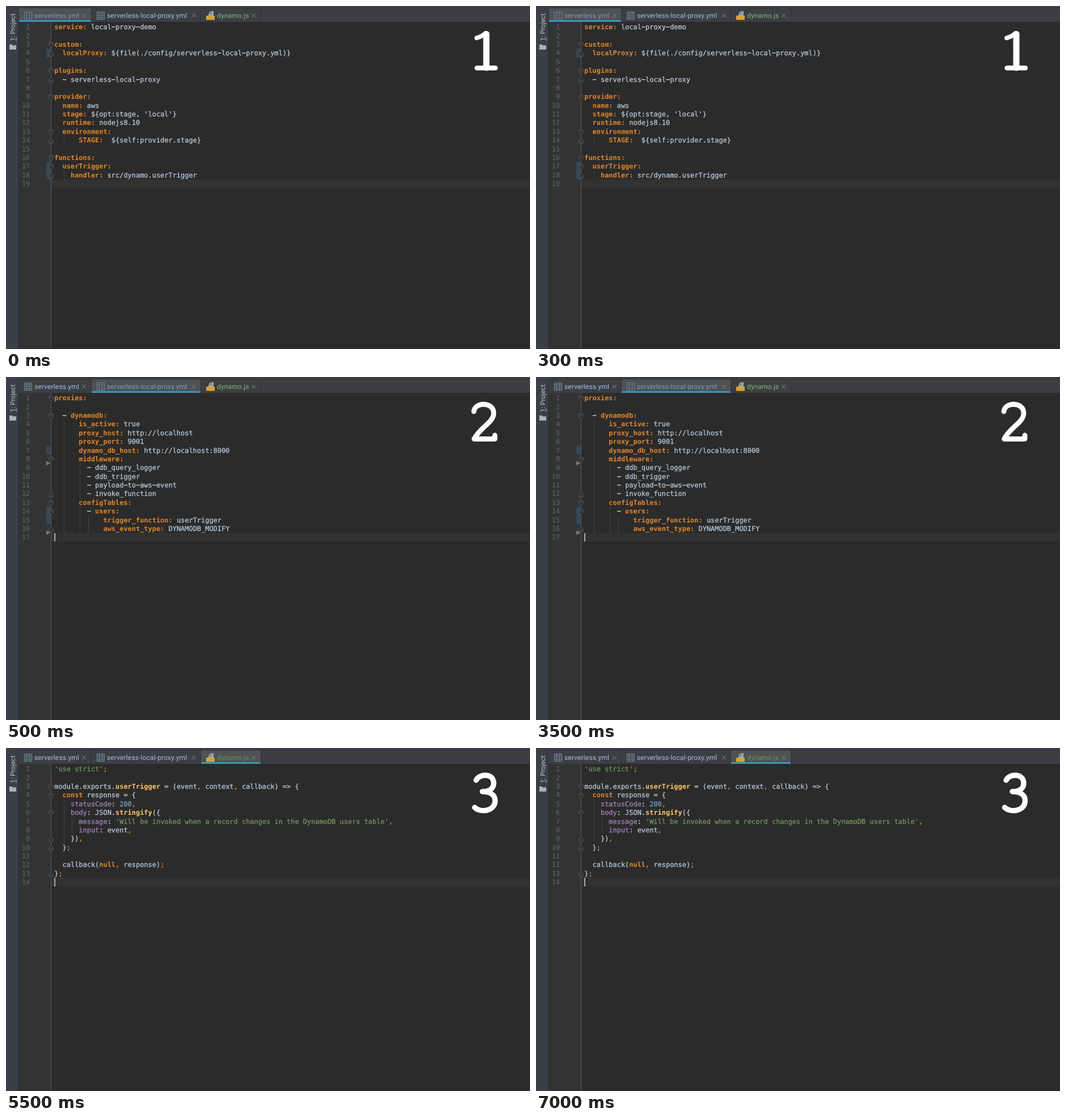
Write an HTML page with a canvas that moves like this. It is 924 by 606 pixels and loops after 8 s.

```html
<!DOCTYPE html>
<html lang="en">
<head>
<meta charset="utf-8">
<title>Local proxy configuration</title>
<style>
  html, body { margin: 0; width: 100%; height: 100%; overflow: hidden; background: #2b2b2b; }
  canvas { display: block; width: 924px; height: 606px; }
</style>
</head>
<body>
<canvas id="stage"></canvas>
<script>
const W = 924, H = 606, LOOP = 8000;
const MONO = '"DejaVu Sans Mono", monospace';
const UI = 'Roboto, sans-serif';
const CODE_X = 85.2, ADVANCE = 7.19, CODE_SIZE = 11.94;
const ROW = 15.39, FIRST_MID = 37;

const C = {
  editor: '#2b2b2b', gutter: '#313335', bar: '#3c3e44', strip: '#3d3f48',
  activeTab: '#4f5254', edge: '#2f3135', accent: '#3a97b8', caretRow: '#323232',
  text: '#b8c7d6', key: '#df862a', string: '#6f965b', number: '#6f9fc6',
  prop: '#a580b9', func: '#ffc66d', lineNo: '#63666a', fold: '#606365',
  guide: '#3f4143', change: '#364856', icon: '#72848f'
};

const tabs = [
  { x: 23, end: 150, label: 'serverless.yml', type: 'yml' },
  { x: 151, end: 343, label: 'serverless-local-proxy.yml', type: 'yml' },
  { x: 344, end: 449, label: 'dynamo.js', type: 'js' }
];

// Row numbers start at 1; guides are [column, first row, last row].
const scenes = [
  {
    start: 0, type: 'yml', down: [3, 6, 9, 13, 16, 17], up: [4, 7, 14, 18],
    changes: [[4, 4], [17, 18]], marks: [], caret: false,
    guides: [[2, 14, 14], [2, 18, 18]],
    code: `service: local-proxy-demo

custom:
  localProxy: \${file(./config/serverless-local-proxy.yml)}

plugins:
  - serverless-local-proxy

provider:
  name: aws
  stage: \${opt:stage, 'local'}
  runtime: nodejs8.10
  environment:
      STAGE:  \${self:provider.stage}

functions:
  userTrigger:
    handler: src/dynamo.userTrigger
`
  },
  {
    start: 500, type: 'yml', down: [1, 3, 8, 13, 14], up: [12, 16],
    changes: [[7, 7], [14, 15]], marks: [152.3, 275], caret: true,
    guides: [[2, 4, 16], [6, 9, 12], [6, 14, 16], [8, 15, 16]],
    code: `proxies:

  - dynamodb:
      is_active: true
      proxy_host: http://localhost
      proxy_port: 9001
      dynamo_db_host: http://localhost:8000
      middleware:
        - ddb_query_logger
        - ddb_trigger
        - payload-to-aws-event
        - invoke_function
      configTables:
        - users:
            trigger_function: userTrigger
            aws_event_type: DYNAMODB_MODIFY
`
  },
  {
    start: 5500, type: 'js', down: [3, 4, 6], up: [9, 10, 13],
    changes: [], marks: [], caret: true,
    guides: [[2, 5, 9], [4, 7, 8]],
    code: `'use strict';

module.exports.userTrigger = (event, context, callback) => {
  const response = {
    statusCode: 200,
    body: JSON.stringify({
      message: 'Will be invoked when a record changes in the DynamoDB users table',
      input: event,
    }),
  };

  callback(null, response);
};
`
  }
];

const canvas = document.getElementById('stage');
const ctx = canvas.getContext('2d');
const dpr = window.devicePixelRatio || 1;
canvas.width = W * dpr;
canvas.height = H * dpr;
ctx.scale(dpr, dpr);
ctx.textRendering = 'geometricPrecision';

const mid = row => FIRST_MID + (row - 1) * ROW;

function rect(x, y, w, h, color) {
  ctx.fillStyle = color;
  ctx.fillRect(x, y, w, h);
}

function line(points, color, width = 1, close = false) {
  ctx.beginPath();
  points.forEach(([x, y]) => ctx.lineTo(x, y));
  if (close) ctx.closePath();
  ctx.strokeStyle = color;
  ctx.lineWidth = width;
  ctx.stroke();
}

// A thin outline gives text the heavier look of strong font smoothing.
function label(text, x, y, font, color, { spacing = 0, outline = 0 } = {}) {
  ctx.font = font;
  ctx.fillStyle = ctx.strokeStyle = color;
  ctx.letterSpacing = spacing + 'px';
  ctx.fillText(text, x, y);
  if (outline) {
    ctx.lineWidth = outline;
    ctx.strokeText(text, x, y);
  }
  ctx.letterSpacing = '0px';
}

// Splits a line into [text, color, bold] pieces.
function yamlTokens(src) {
  const m = src.match(/^(\s*(?:- )?)(\w+:)(.*)$/);
  return m ? [[m[1], C.text], [m[2], C.key, true], [m[3], C.text]] : [[src, C.text]];
}

function jsTokens(src) {
  const rule = /('[^']*')|\b(const|null)\b|\b(\d+)\b|(userTrigger|stringify)|(\w+)(?=:)|([,;])/g;
  const styles = [[C.string], [C.key, true], [C.number], [C.func, true], [C.prop], [C.key]];
  const out = [];
  let last = 0;
  for (const m of src.matchAll(rule)) {
    out.push([src.slice(last, m.index), C.text]);
    out.push([m[0], ...styles[m.slice(1).findIndex(g => g !== undefined)]]);
    last = m.index + m[0].length;
  }
  out.push([src.slice(last), C.text]);
  return out;
}

function drawCodeLine(tokens, y) {
  let col = 0;
  for (const [text, color, bold] of tokens) {
    const font = `${bold ? 'bold ' : ''}${CODE_SIZE}px ${MONO}`;
    for (const word of text.matchAll(/\S+/g)) {
      const x = CODE_X + (col + word.index) * ADVANCE;
      // The editor font has a wide hyphen, closest to a minus sign here.
      label(word[0].replace(/-/g, '\u2212'), x, y, font, color, { outline: bold ? 0 : 0.3 });
    }
    col += text.length;
  }
}

function drawFold(row, dir) {
  const x = 79.5, y = mid(row) + 1.2;
  const shape = [[-3.5, -4], [3.5, -4], [3.5, 1], [0, 4], [-3.5, 1]]
    .map(([dx, dy]) => [x + dx, y + dy * dir]);
  ctx.beginPath();
  shape.forEach(p => ctx.lineTo(...p));
  ctx.fillStyle = C.editor;
  ctx.fill();
  line(shape, C.fold, 0.9, true);
  line([[x - 2, y - dir], [x + 2, y - dir]], C.fold, 0.9);
}

function drawTableIcon(x) {
  rect(x, 10, 14, 14, '#3d4a53');
  ctx.strokeStyle = C.icon;
  ctx.lineWidth = 1;
  ctx.strokeRect(x + 0.5, 10.5, 13, 13);
  for (const dx of [4.5, 9.5]) line([[x + dx, 10], [x + dx, 24]], C.icon);
  for (const y of [13.5, 17, 20.5]) line([[x, y], [x + 14, y]], C.icon, 0.8);
}

function drawScriptIcon(x) {
  ctx.beginPath();
  [[4, 13], [8, 9], [13, 9], [13, 17], [4, 17]].forEach(([dx, y]) => ctx.lineTo(x + dx, y));
  ctx.fillStyle = '#9aa7b0';
  ctx.fill();
  line([[x + 4, 13.5], [x + 8.5, 13.5], [x + 8.5, 9]], '#56606a');
  rect(x, 17, 15, 7.5, '#d9a334');
}

function drawTab(tab, active) {
  const script = tab.type === 'js';
  if (active) {
    rect(tab.x, 4, tab.end - tab.x, 24, C.activeTab);
    rect(tab.x, 25, tab.end - tab.x, 3, C.accent);
  }
  rect(tab.end, 4, 1, 24, C.edge);
  (script ? drawScriptIcon : drawTableIcon)(tab.x + 9);
  const color = script ? (active ? '#6a9552' : '#8ab56e') : (active ? '#6c9fc8' : '#a3c1de');
  label(tab.label, tab.x + (script ? 28 : 27), 20.5, `12px ${UI}`, color, { spacing: 0.15 });
  const x = tab.end - 12, y = 17;
  line([[x - 3.5, y - 3.5], [x + 3.5, y + 3.5]], '#7f8488');
  line([[x - 3.5, y + 3.5], [x + 3.5, y - 3.5]], '#7f8488');
}

function drawFrame(index) {
  rect(0, 0, W, H, C.editor);
  rect(22, 28, 57, H - 28, C.gutter);
  rect(0, 0, W, 28, C.bar);
  rect(22, 3, W - 22, 1, C.edge);
  rect(0, 0, 22, H, C.strip);
  rect(21, 4, 1, H - 4, C.edge);

  ctx.save();
  ctx.translate(16, 62);
  ctx.rotate(-Math.PI / 2);
  label('1: Project', 0, 0, `11.6px ${UI}`, '#c0c4c9');
  rect(0.5, 1.5, 6, 1, '#c0c4c9');
  ctx.restore();
  rect(6, 68, 5, 3, '#aeb2b6');
  rect(6, 69.5, 12, 7.5, '#aeb2b6');

  tabs.forEach((tab, i) => drawTab(tab, i === index));
}

// Large step numerals with round ends.
function drawDigit(index) {
  const strokes = [
    [['M830 56.5Q840 53.5 845 48.5', 8], ['M847 49.5V109', 11], ['M830.5 109.5H863', 8.5]],
    [['M825 61C826 44 860 43 860 64C860 80 836 89 825.5 109.5H862V103', 8.8]],
    [['M829 57C834 45 860 44 860 62C860 73 850 77 840 77C854 77 862.5 83 862.5 93C862.5 112 836 115 826.5 105', 9.4]]
  ][index];
  ctx.lineCap = ctx.lineJoin = 'round';
  ctx.strokeStyle = '#fff';
  for (const [path, width] of strokes) {
    ctx.lineWidth = width;
    ctx.stroke(new Path2D(path));
  }
  ctx.lineCap = 'butt';
  ctx.lineJoin = 'miter';
}

function drawScene(index) {
  const scene = scenes[index];
  const lines = scene.code.split('\n');
  const lastMid = mid(lines.length);
  drawFrame(index);
  rect(80, lastMid - ROW / 2, W - 80, ROW, C.caretRow);

  for (const [from, to] of scene.changes) {
    rect(71, mid(from) - ROW / 2, 8, (to - from + 1) * ROW, C.change);
  }
  rect(79, 28, 1, H - 28, '#56595b');
  for (const [col, from, to] of scene.guides) {
    const x = Math.round(CODE_X + col * ADVANCE + 2);
    rect(x, mid(from) - ROW / 2, 1, (to - from + 1) * ROW, C.guide);
  }
  scene.down.forEach(row => drawFold(row, 1));
  scene.up.forEach(row => drawFold(row, -1));
  for (const y of scene.marks) {
    ctx.beginPath();
    [[71, y - 4], [78.5, y], [71, y + 4]].forEach(p => ctx.lineTo(...p));
    ctx.fillStyle = '#77797b';
    ctx.fill();
  }

  const tokenize = scene.type === 'js' ? jsTokens : yamlTokens;
  lines.forEach((src, i) => {
    const base = mid(i + 1) + 4.2;
    ctx.textAlign = 'right';
    label(i + 1, 42.3, base, `${CODE_SIZE}px ${MONO}`, C.lineNo);
    ctx.textAlign = 'left';
    drawCodeLine(tokenize(src), base);
  });
  if (scene.caret) rect(85.3, lastMid - 7.5, 1.6, 15, '#c8c8c8');
  drawDigit(index);
}

let shown = -1;
function tick() {
  const t = performance.now() % LOOP;
  const index = scenes.filter(s => s.start <= t).length - 1;
  if (index !== shown) drawScene(shown = index);
  requestAnimationFrame(tick);
}
tick();
</script>
</body>
</html>
```
